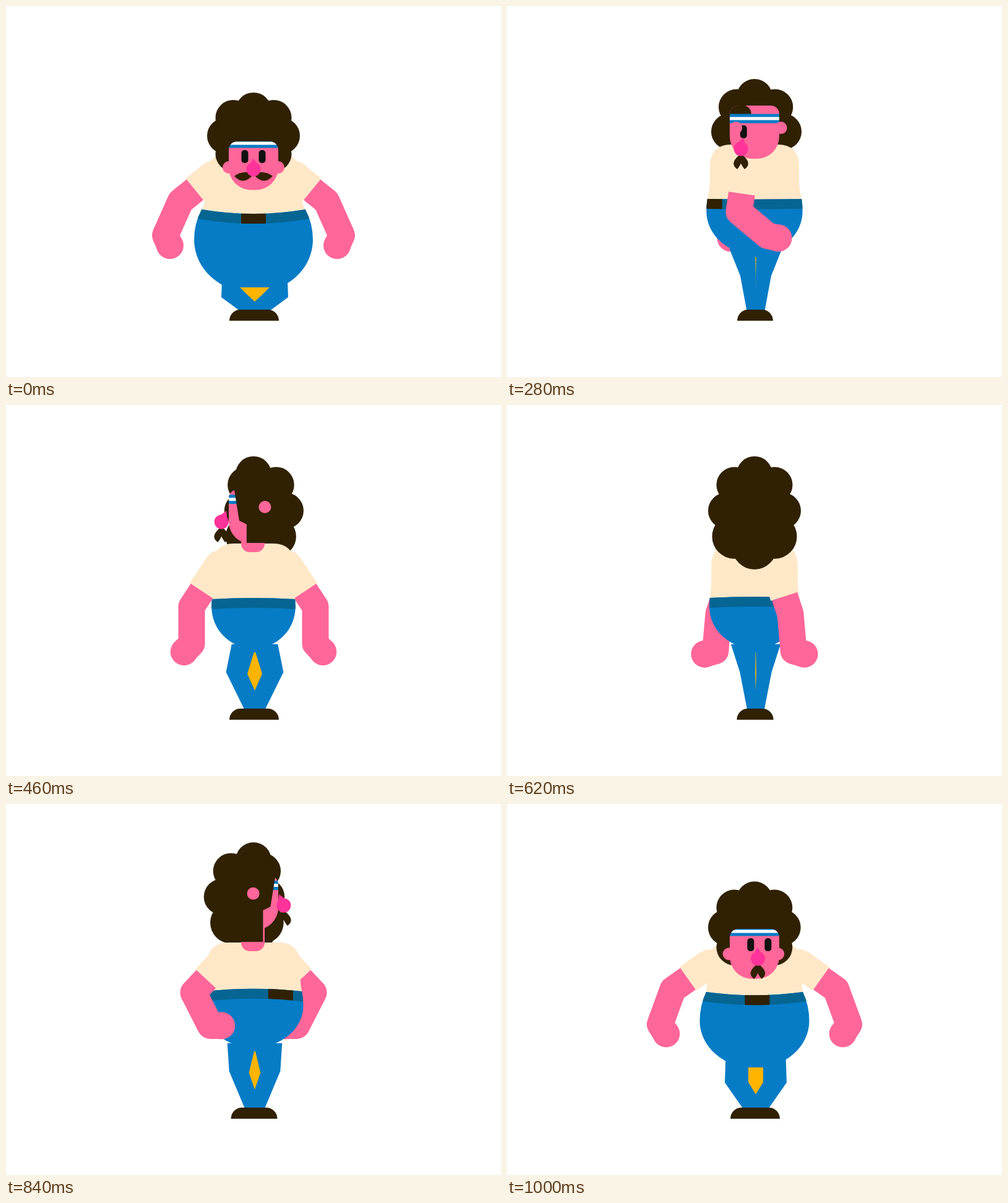
Animation of 800 by 600 pixels, one loop 1020 ms. Source, as an HTML page with a canvas:

```html
<!DOCTYPE html>
<html>
<head>
<meta charset="utf-8">
<style>
html, body { margin: 0; width: 100%; height: 100%; overflow: hidden; background: #fff; }
canvas { display: block; }
</style>
</head>
<body>
<canvas id="stage" width="800" height="600"></canvas>
<script>
const g = document.getElementById('stage').getContext('2d');
const { sin, cos, abs, min, max, PI } = Math;
const LOOP = 1020, STEP = 20, MID = 400, FLOOR = 509;
const HAIR = '#302102', SKIN = '#ff6699', NOSE = '#ff3399', SHIRT = '#ffe8c8',
      BLUE = '#067cc6', BELT = '#066592', GOLD = '#ffb400';

// Key poses; the body leads the turn and the head follows. Angles in degrees.
const TIMES = [0, 120, 280, 460, 620, 840, 1000];
const KEYS = {
  turn: [0, 12, 78, 180, 255, 325, 357],
  look: [0, 0, 25, 85, 180, 250, 354],
  crouch: [1, 0.97, 0.15, 0.05, 0.05, 0.05, 0.5],
  waist: [329, 364, 312, 314, 312, 303, 304],
  brow: [219, 245, 161, 137, 138, 116, 202],
  nose: [45, 27, 70, 52, 48, 48, 48],
  elbowX: [518, 477, 375, 300, 342, 497, 532],
  elbowY: [316, 348, 333, 326, 338, 305, 300],
  forearm: [66, 14, 40, 90, 95, 117, 70],
  hand: [114, 16, 12, 133, 164, 180, 123]
};
const LAP = { turn: 360, look: 360 };

// Monotone cubic through the key poses, going round the loop.
function at(name, t) {
  const n = TIMES.length, lap = LAP[name] || 0;
  const wrap = (list, j, step) => list[(j + n) % n] + Math.floor(j / n) * step;
  const time = j => wrap(TIMES, j, LOOP), value = j => wrap(KEYS[name], j, lap);
  const gap = j => time(j + 1) - time(j);
  const slope = j => (value(j + 1) - value(j)) / gap(j);
  const tangent = j => {
    const p = slope(j - 1), q = slope(j), a = gap(j - 1), b = gap(j);
    return p * q <= 0 ? 0 : 3 * (a + b) / ((2 * b + a) / p + (b + 2 * a) / q);
  };
  t = (t + LOOP) % LOOP;
  const i = TIMES.findLastIndex(key => key <= t), h = gap(i);
  const u = (t - time(i)) / h, v = 1 - u;
  return value(i) * v * v * (1 + 2 * u) + value(i + 1) * u * u * (3 - 2 * u)
    + h * u * v * (v * tangent(i) - u * tangent(i + 1));
}

const rad = degrees => degrees * PI / 180;

function fill(color, path) {
  g.fillStyle = color;
  g.fill(path);
}

function trace(points) {
  const path = new Path2D();
  for (let i = 0; i < points.length; i += 2) path.lineTo(points[i], points[i + 1]);
  return path;
}

const poly = (color, ...points) => fill(color, trace(points));

function stroke(color, width, path) {
  g.strokeStyle = color;
  g.lineWidth = width;
  g.stroke(path);
}

const line = (color, width, ...points) => stroke(color, width, trace(points));

function oval(color, x, y, rx, ry = rx) {
  const path = new Path2D();
  path.ellipse(x, y, rx, ry, 0, 0, 2 * PI);
  fill(color, path);
}

function box(color, x, y, w, h, r) {
  const path = new Path2D();
  path.roundRect(x, y, w, h, r);
  fill(color, path);
}

function clipped(path, draw) {
  g.save();
  g.clip(path);
  draw();
  g.restore();
}

// side is 1 for one arm and -1 for its mirror image.
function drawArm(p, side) {
  const x = dx => MID + side * dx;
  const ex = p.elbowX - MID, ey = p.elbowY;
  const sx = 0.55 * ex, sy = p.chest + 34;
  const k = 30 / Math.hypot(ex - sx, ey - sy);
  const cx = ex - (ex - sx) * k, cy = ey - (ey - sy) * k;
  const wx = ex + 60 * cos(rad(p.forearm)), wy = ey + 60 * sin(rad(p.forearm));
  const hx = wx + 18 * cos(rad(p.hand)), hy = wy + 18 * sin(rad(p.hand));
  oval(SHIRT, x(sx), sy, 23);
  line(SHIRT, 47, x(sx), sy, x(cx), cy);
  line(SKIN, 43, x(cx), cy, x(ex), ey, x(wx), wy, x(hx), hy);
  oval(SKIN, x(hx), hy, 22);
}

function drawBody(p) {
  const { waist, crouch: c, chest } = p;
  const facing = cos(rad(p.turn)), open = abs(facing);
  const belly = 74 + 7 * facing + 15 * c, hip = 384 + 54 * c, round = hip - 60;
  const rise = Math.asin((round - waist) / 100), half = belly * cos(rise);
  const sag = (p.brow - 155) / 9;

  const top = new Path2D();
  top.moveTo(MID - half, waist);
  top.quadraticCurveTo(MID, waist + 2 * sag, MID + half, waist);

  const side = 71 + 5 * facing, shirt = new Path2D(top);
  shirt.quadraticCurveTo(MID + side, waist - 15, MID + side, waist - 35);
  shirt.lineTo(MID + side, chest + 36);
  shirt.quadraticCurveTo(MID + side, chest, MID + side - 35, chest);
  shirt.lineTo(MID - side + 35, chest);
  shirt.quadraticCurveTo(MID - side, chest, MID - side, chest + 36);
  shirt.lineTo(MID - side, waist - 35);
  shirt.quadraticCurveTo(MID - side, waist - 15, MID - half, waist);
  fill(SHIRT, shirt);

  const pants = new Path2D(top);
  pants.ellipse(MID, round, belly, 100, 0, -rise, 0);
  pants.ellipse(MID, round, belly, 66 + 20 * c, 0, 0, PI);
  pants.ellipse(MID, round, belly, 100, 0, PI, PI + rise);
  fill(BLUE, pants);

  const legX = 402, knee = 430 + 41 * c, thigh = 0.55 * belly;
  const bend = 18 + 28 * open + 8 * c, ankle = 12.5 + 4 * open + 9 * c;
  poly(BLUE, legX - thigh, hip, legX + thigh, hip, legX + bend, knee,
    legX + ankle, 492, legX - ankle, 492, legX - bend, knee);
  const wide = 24 * c * open, slit = max(0, 15 * open - 3);
  if (slit) {
    poly(GOLD, legX - wide, 397 + 58 * c, legX + wide, 397 + 58 * c,
      legX + slit, 433 + 34 * c, legX, 461 + 17 * c, legX - slit, 433 + 34 * c);
  }
  const shoe = 26 + 14 * open;
  box(HAIR, legX - 1 - shoe, FLOOR - 18, 2 * shoe, 18, [18, 18, 0, 0]);

  clipped(pants, () => {
    g.lineCap = 'square';
    stroke(BELT, 32, top);
    if (facing <= 0) return;
    const buckle = new Path2D();
    buckle.rect(MID - 0.95 * belly * sin(rad(p.turn)) - 20, 0, 40, 600);
    clipped(buckle, () => stroke(HAIR, 32, top));
  });
}

// Eight curls in a ring, pushed to the back of the head as it turns.
function drawHair(p) {
  const s = sin(p.yaw), middle = p.brow + p.lag - 26 + p.tall;
  const curls = Array.from({ length: 8 }, (_, i) => {
    const a = i * PI / 4, dx = sin(a), low = cos(a) < -0.1;
    const rx = dx * s < 0 ? 46 - 28 * s * s : 46 + 6 * s * s;
    const r = 29 + (low ? 3.5 * (1 - cos(p.yaw)) : 0);
    return [MID + rx * dx, middle - p.tall * cos(a), r];
  });
  poly(HAIR, ...curls.flatMap(([x, y]) => [x, y]));
  for (const curl of curls) oval(HAIR, ...curl);
}

function drawMoustache(p, x, y) {
  const droop = min(1, 10 * abs(sin(p.yaw)));
  for (const side of [-1, 1]) {
    const tx = side * (31 - 25 * droop), ty = 3 + 22 * droop;
    const cx = side * (16 + 4 * droop), cy = 20 - 5 * droop;
    const half = new Path2D();
    half.moveTo(x, y);
    half.quadraticCurveTo(x + cx, y + cy, x + tx, y + ty);
    half.quadraticCurveTo(x + 0.75 * tx - cx / 2, y + 0.75 * ty - cy / 2, x, y);
    fill(HAIR, half);
  }
}

function drawFace(p) {
  const s = sin(p.yaw), c = cos(p.yaw), y = p.brow, tilt = p.lag / 2;
  const height = 58 + p.tall / 2;
  const face = new Path2D();
  face.roundRect(MID - 40, y, 80, height, [14, 14, 36, 36]);
  if (abs(s) > 0.85) box(SKIN, 380, y + height - 20, 38, 258 - y - height, [0, 0, 14, 14]);
  fill(SKIN, face);
  clipped(face, () => {
    for (const dx of [-14, 14]) box('#111', MID + dx - 75 * s - 5.5, y + 26 + tilt, 11, 21, 5);
    oval(HAIR, MID - 60 * s, y + p.lag, 20, 14);
    line(BLUE, 15, 350, y + 15 + tilt, 450, y + 15 + tilt);
    line('#fff', 5, 350, y + 15 + tilt, 450, y + 15 + tilt);
  });

  // Side hair over the cheek.
  const cover = c > 0 ? 60 * s ** 4 - 8 : 52 - 10 * c;
  if (cover > 0) {
    const back = Math.sign(s), rim = MID + 40 * back, edge = rim - back * cover;
    poly(HAIR, rim, y, rim, 223, edge, 223, edge, y + 56,
      edge - 12 * back, y + 50, edge - 20 * back, y);
  }
  for (const side of [-1, 1]) {
    if (side * s > -0.6) oval(SKIN, MID + side * 40 * c + 15 * s, y + 42 - 14 * abs(s), 10);
  }

  const bx = MID - 52 * s, by = y + p.nose, tx = MID - 44 * s, ty = by - 18;
  drawMoustache(p, bx, by + 8);
  const a = Math.atan2(by - ty, bx - tx), dx = 11 * sin(a), dy = 11 * cos(a);
  poly(NOSE, tx, ty, bx + dx, by - dy, bx - dx, by + dy);
  oval(NOSE, bx, by, 11.5);
}

function draw(t) {
  const p = {};
  for (const name in KEYS) p[name] = at(name, t);
  p.yaw = rad(p.look);
  p.chest = max(224, p.waist - 90);
  p.lag = at('brow', t - 30) - p.brow;
  p.tall = min(59, 98 - 0.26 * p.brow);

  const near = sin(rad(p.turn)) >= 0 ? 1 : -1;
  const sideways = abs(sin(p.yaw)) > 0.4, away = cos(p.yaw) < -0.6;
  g.clearRect(0, 0, 800, 600);
  g.lineCap = 'butt';
  g.lineJoin = 'round';
  if (sideways && !away) drawHair(p);
  drawArm(p, -near);
  drawBody(p);
  g.lineCap = 'butt';
  drawArm(p, near);
  if (away) drawFace(p);
  if (!sideways || away) drawHair(p);
  if (!away) drawFace(p);
}

function tick() {
  draw(Math.floor(performance.now() % LOOP / STEP) * STEP);
  requestAnimationFrame(tick);
}
tick();
</script>
</body>
</html>
```
